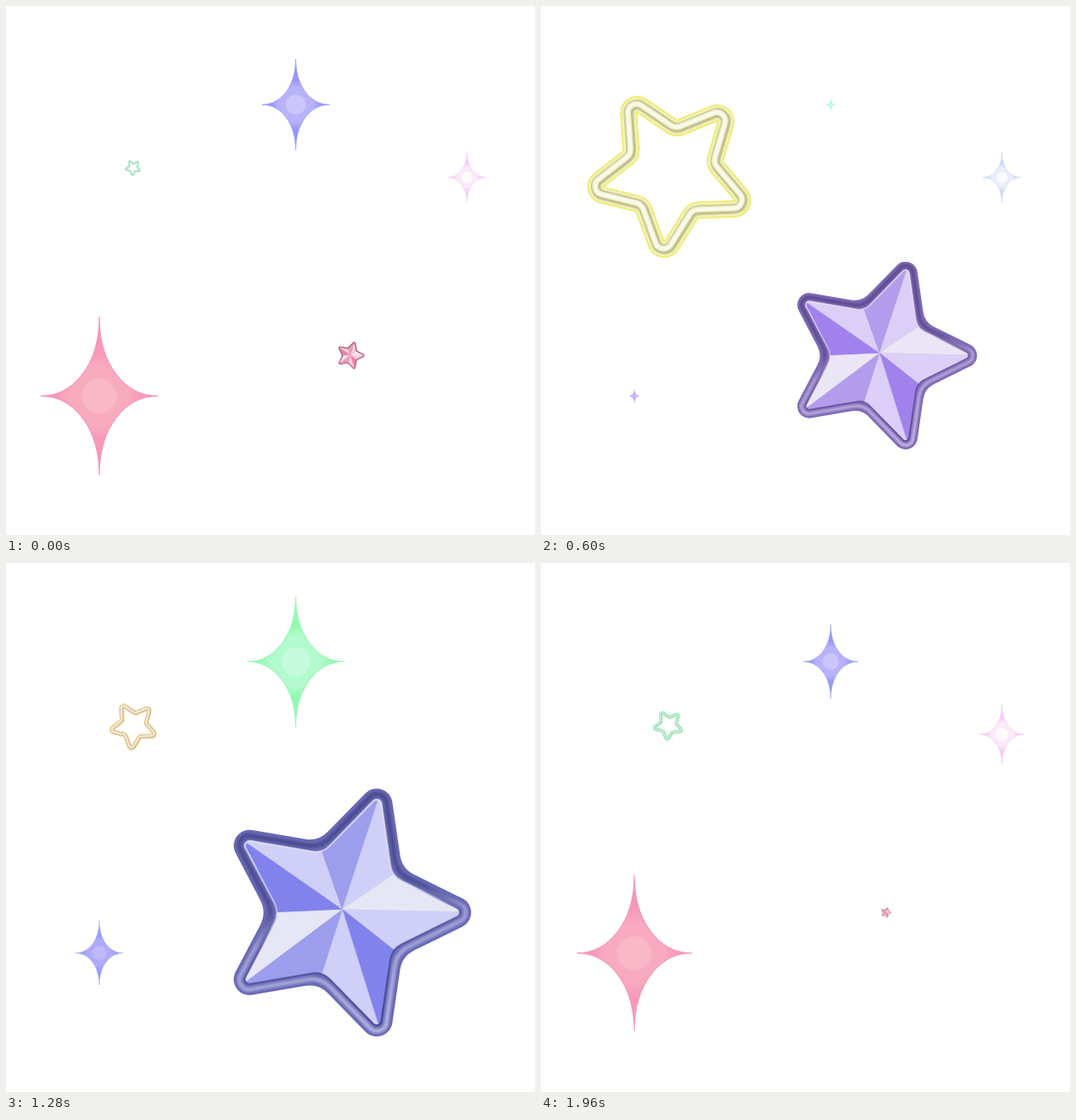
Write an HTML page with a canvas that moves like this. It is 618 px wide and 618 px high and loops after 2000 ms.

```html
<!DOCTYPE html>
<html lang="en">
<head>
<meta charset="utf-8">
<title>Twinkling stars</title>
<style>
html, body { margin: 0; width: 100%; height: 100%; overflow: hidden; background: #fff; }
canvas { display: block; width: 618px; height: 618px; }
</style>
</head>
<body>
<canvas id="stage" width="618" height="618"></canvas>
<script>
const ctx = document.getElementById('stage').getContext('2d');
const LOOP = 2000, BEAT = 1000, STEP = 40;

// Each sparkle: centre, half size, time of its peak, colour, lightness from core to tip
const sparkles = [
  { x: 109, y: 455.7, w: 68, h: 92, peak: 0, hue: 347, sat: 84, light: [85, 82, 78] },
  { x: 338.5, y: 115.2, w: 60, h: 81, peak: 200, hue: 247, sat: 88, light: [88, 84, 78] },
  { x: 538.5, y: 200.2, w: 33.5, h: 45, peak: 800, hue: 310, sat: 66, light: [99, 95, 88] }
];

const hsl = (h, s, l, a = 1) => `hsla(${(h + 360) % 360}, ${s}%, ${l}%, ${a})`;

// Size swings between 0 and 1 once per beat
const swell = (t, peak) => (1 + Math.cos(2 * Math.PI * (t - peak) / BEAT)) / 2;

// Every hue drifts back by 120 degrees and returns once per loop
const drift = t => -120 * Math.pow(Math.sin(Math.PI * t / LOOP), 1.7);

function polar(r, deg) {
  const a = deg * Math.PI / 180;
  return [r * Math.cos(a), r * Math.sin(a)];
}

function starPath(tip, notch, tipRound, notchRound, turn) {
  const pts = Array.from({ length: 10 }, (_, i) => polar(i % 2 ? notch : tip, turn + i * 36));
  const path = new Path2D();
  const [a, b] = [pts[9], pts[0]];
  path.moveTo((a[0] + b[0]) / 2, (a[1] + b[1]) / 2);
  pts.forEach((p, i) => {
    const next = pts[(i + 1) % 10];
    path.arcTo(p[0], p[1], next[0], next[1], i % 2 ? notchRound : tipRound);
  });
  path.closePath();
  return path;
}

function sparklePath(w, h) {
  const k = 0.42, path = new Path2D();
  path.moveTo(0, -h);
  path.bezierCurveTo(0, -h * k, w * k, 0, w, 0);
  path.bezierCurveTo(w * k, 0, 0, h * k, 0, h);
  path.bezierCurveTo(0, h * k, -w * k, 0, -w, 0);
  path.bezierCurveTo(-w * k, 0, 0, -h * k, 0, -h);
  path.closePath();
  return path;
}

const gem = {
  outer: starPath(202, 101, 21.4, 35, 0),
  middle: starPath(184, 92, 13, 35, 0),
  inner: starPath(168, 84, 6.4, 28, 0)
};
const ring = starPath(103, 51, 10, 12, 24);

// Saturation and lightness of the facet kinds, and their order around the star
const tones = { pale: [42, 93], light: [70, 89], mid: [68, 77], deep: [75, 72] };
const facets = ['light', 'deep', 'light', 'mid', 'pale', 'deep', 'light', 'mid', 'light', 'pale'];

function ramp(gradient, stops) {
  stops.forEach(([at, color]) => gradient.addColorStop(at, color));
  return gradient;
}

function stroke(path, width, style) {
  ctx.lineWidth = width;
  ctx.strokeStyle = style;
  ctx.stroke(path);
}

function placed(x, y, scale, draw) {
  if (scale < 0.002) return;
  ctx.save();
  ctx.translate(x, y);
  ctx.scale(scale, scale);
  ctx.lineJoin = 'round';
  draw();
  ctx.restore();
}

function drawSparkle(s, t) {
  placed(s.x, s.y, swell(t, s.peak), () => {
    const hue = s.hue + drift(t);
    const [core, body, tip] = s.light.map((l, i) => hsl(hue - i * i * 2, s.sat, l));
    const path = sparklePath(s.w, s.h);
    ctx.fillStyle = ramp(ctx.createRadialGradient(0, 0, 0, 0, 0, s.h), [
      [0, core], [0.2, core], [0.24, body], [0.38, body], [0.55, tip], [1, tip]
    ]);
    ctx.fill(path);
    stroke(path, 1.2, tip);
  });
}

function drawFacets(hue) {
  ctx.save();
  ctx.clip(gem.inner);
  facets.forEach((kind, i) => {
    const from = polar(i % 2 ? 84 : 168, i * 36);
    const to = polar(i % 2 ? 168 : 84, i * 36 + 36);
    ctx.beginPath();
    ctx.moveTo(1, -4.5);
    ctx.lineTo(from[0] * 1.2, from[1] * 1.2);
    ctx.lineTo(to[0] * 1.2, to[1] * 1.2);
    ctx.closePath();
    ctx.fillStyle = ctx.strokeStyle = hsl(hue, ...tones[kind]);
    ctx.lineWidth = 0.5;
    ctx.fill();
    ctx.stroke();
  });
  ctx.restore();
}

function drawGem(t) {
  placed(403.5, 408.3, swell(t, 400), () => {
    const hue = 341 + drift(t);
    const down = stops => ramp(ctx.createLinearGradient(-30, -165, 30, 165), stops);
    ctx.translate(-13.3, 0);
    ctx.fillStyle = hsl(hue, 35, 56);
    ctx.fill(gem.outer);
    const bevel = alpha => down([
      [0, hsl(hue, 32, 38, alpha)], [0.45, hsl(hue, 32, 42, alpha)],
      [0.58, hsl(hue, 40, 76, alpha)], [1, hsl(hue, 45, 84, alpha)]
    ]);
    stroke(gem.middle, 10, bevel(0.22));
    stroke(gem.middle, 6.5, bevel(0.35));
    stroke(gem.middle, 3.5, bevel(0.5));
    drawFacets(hue);
    stroke(gem.inner, 2.4, down([
      [0, hsl(hue, 50, 95, 0.9)], [0.45, hsl(hue, 50, 92, 0.6)],
      [0.58, hsl(hue, 35, 42, 0.6)], [1, hsl(hue, 35, 38, 0.9)]
    ]));
  });
}

function drawRing(t) {
  placed(148, 188.3, swell(t, 600), () => {
    const hue = 143 + drift(t);
    ctx.translate(4.4, 6.2);
    stroke(ring, 20, hsl(hue, 80, 65));
    stroke(ring, 17, hsl(hue, 70, 83));
    stroke(ring, 12, hsl(hue, 36, 72));
    stroke(ring, 9.5, hsl(hue, 30, 64));
    ctx.translate(-0.8, -0.8);
    stroke(ring, 7, hsl(hue, 50, 85));
    stroke(ring, 4, hsl(hue, 60, 95));
  });
}

function render() {
  const t = Math.floor(performance.now() % LOOP / STEP) * STEP;
  ctx.fillStyle = '#fff';
  ctx.fillRect(0, 0, 618, 618);
  sparkles.forEach(s => drawSparkle(s, t));
  drawRing(t);
  drawGem(t);
  requestAnimationFrame(render);
}
render();
</script>
</body>
</html>
```
